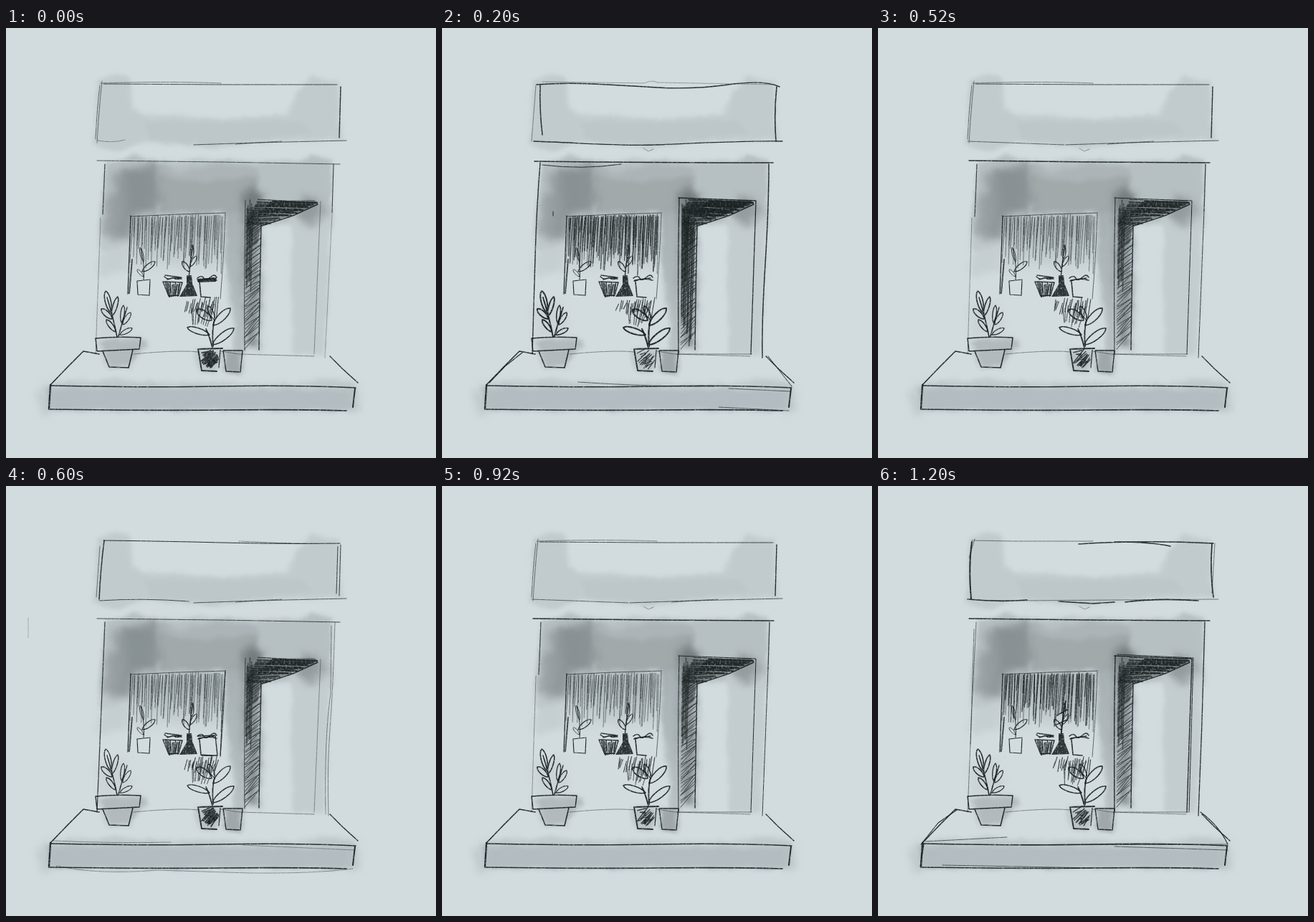
Recreate the animation shown at these times as an HTML page. Size 600 px wide and 600 px high, loop 1400 ms.

```html
<!DOCTYPE html>
<html lang="en">
<head>
<meta charset="utf-8">
<title>Shopfront sketch</title>
<style>
html, body { margin: 0; width: 100%; height: 100%; overflow: hidden; background: #d2dcdf; }
svg { display: block; width: 100%; height: 100%; }
.ink { fill: none; stroke: #192022; stroke-linecap: round; stroke-linejoin: round; filter: url(#pencil); }
.pose { visibility: hidden; animation: 1400ms step-end infinite; }
#a { animation-name: a; }
#b { animation-name: b; }
#c { animation-name: c; }
#d { animation-name: d; }
#e { animation-name: e; }
@keyframes a { 0% { visibility: visible; } 14.2857%, 100% { visibility: hidden; } }
@keyframes b {
  0%, 28.5714%, 85.7143%, 100% { visibility: hidden; }
  14.2857%, 71.4286% { visibility: visible; }
}
@keyframes c {
  0%, 42.8571%, 71.4286%, 100% { visibility: hidden; }
  28.5714%, 57.1429% { visibility: visible; }
}
@keyframes d { 0%, 57.1429%, 100% { visibility: hidden; } 42.8571% { visibility: visible; } }
@keyframes e { 0% { visibility: hidden; } 85.7143%, 100% { visibility: visible; } }
</style>
</head>
<body>
<svg viewBox="0 0 600 600">
  <defs>
    <filter id="pencil" filterUnits="userSpaceOnUse" x="0" y="0" width="600" height="600" color-interpolation-filters="sRGB">
      <feTurbulence type="fractalNoise" baseFrequency=".4" numOctaves="2" seed="4" result="n"/>
      <feDisplacementMap in="SourceGraphic" in2="n" scale="1.2" xChannelSelector="R" yChannelSelector="G" result="s"/>
      <feColorMatrix in="n" values="0 0 0 0 0  0 0 0 0 0  0 0 0 0 0  -1.5 0 0 0 1.75" result="m"/>
      <feComposite in="s" in2="m" operator="in"/>
    </filter>
    <filter id="wash" filterUnits="userSpaceOnUse" x="0" y="0" width="600" height="600" color-interpolation-filters="sRGB">
      <feTurbulence type="fractalNoise" baseFrequency=".035" numOctaves="3" seed="9" result="n"/>
      <feGaussianBlur in="SourceGraphic" stdDeviation="3" result="s"/>
      <feDisplacementMap in="s" in2="n" scale="9" xChannelSelector="R" yChannelSelector="G"/>
    </filter>
    <filter id="soft" filterUnits="userSpaceOnUse" x="0" y="0" width="600" height="600" color-interpolation-filters="sRGB">
      <feTurbulence type="fractalNoise" baseFrequency=".03" numOctaves="3" seed="2" result="n"/>
      <feGaussianBlur in="SourceGraphic" stdDeviation="6" result="s"/>
      <feDisplacementMap in="s" in2="n" scale="14" xChannelSelector="R" yChannelSelector="G"/>
    </filter>
    <linearGradient id="column" x1="0" y1="0" x2="0" y2="1">
      <stop offset="0" stop-color="#a6afb2"/><stop offset="1" stop-color="#b8c1c4"/>
    </linearGradient>
    <linearGradient id="pane" x1="0" y1="0" x2="0" y2="1">
      <stop offset="0" stop-color="#a5aeb1"/><stop offset="1" stop-color="#a5aeb1" stop-opacity="0"/>
    </linearGradient>
    <linearGradient id="shade" x1="0" y1="0" x2="1" y2="0">
      <stop offset="0" stop-color="#9aa2a5"/><stop offset=".55" stop-color="#7f878a"/><stop offset="1" stop-color="#858d90"/>
    </linearGradient>
  </defs>

  <g filter="url(#wash)">
    <path fill="#c1cbcd" d="M126 74L150 65L174 70L176 108Q182 120 210 122L300 126L386 122Q404 110 404 92L424 68L464 76L468 156L400 158L330 162L285 168L240 162L195 161L150 171L122 166Z"/>
    <path fill="#b9c3c5" opacity=".5" d="M195 132L410 130L430 148L300 163L200 160Z"/>
    <path fill="#b6bfc1" d="M138 190L180 178L210 187L300 186L405 186L430 178L454 184L455 280L400 285L398 274L356 276L330 300L304 258L174 262L172 296Q155 312 132 308Z"/>
    <path fill="#c3ccce" d="M400 264L453 264L446 456L402 456Q394 350 400 264Z"/>
    <path fill="url(#column)" d="M305 255L335 250L333 454L320 454L316 390L307 350Z"/>
    <path fill="#9aa2a5" opacity=".75" d="M214 190L245 200L290 190L352 194L352 250L308 258L214 260Z"/>
    <path fill="#b9c2c5" opacity=".45" d="M215 184H355V205L280 216L215 204Z"/>
    <path fill="#b3bdc1" d="M56 500L488 503L487 534L56 534Z"/>
    <path fill="#c0cacc" d="M64 494L150 490L210 494L400 496L440 488L486 498L484 505L62 502Z"/>
    <path fill="#b2babd" d="M127 435L190 432L198 440L186 454L176 474L145 474L136 455Z"/>
    <path fill="#9fa7aa" d="M304 450L330 450L327 482L306 480Z"/>
    <path fill="#b9c2c5" d="M264 448H302L296 482L270 478Z"/>
  </g>
  <g filter="url(#soft)">
    <path fill="url(#shade)" opacity=".85" d="M152 196L212 192L216 254L178 260L172 296L150 304L138 288L137 240L152 226Z"/>
    <path fill="#b9c3c6" opacity=".7" d="M44 510L62 494L64 536L50 538ZM440 490L490 496L494 534L478 538L482 504Z"/>
    <path fill="#c2cbce" opacity=".8" d="M129 298L172 290L170 340L130 350Z"/>
    <path fill="#cad3d6" d="M128 385L168 380L172 430L128 434Z"/>
    <path fill="url(#pane)" d="M176 264H302V345H176Z"/>
    <ellipse cx="344" cy="242" rx="17" ry="16" fill="#6b7275" opacity=".8"/>
    <ellipse cx="423" cy="255" rx="16" ry="20" fill="#8a9194" opacity=".75"/>
    <path fill="#737b7e" opacity=".8" d="M332 255H355L353 448H336Z"/>
  </g>

  <g id="base" class="ink"></g>
  <g id="a" class="ink pose"></g>
  <g id="b" class="ink pose"></g>
  <g id="c" class="ink pose"></g>
  <g id="d" class="ink pose"></g>
  <g id="e" class="ink pose"></g>
</svg>
<script>
let seed = 17;
const rnd = (lo = 0, hi = 1) => {
  seed = (seed * 16807) % 2147483647;
  return lo + (hi - lo) * seed / 2147483647;
};
const mix = (p, q, t) => p + (q - p) * t;
const f = n => n.toFixed(1);
const line = (d, w = 1.5, o = .95) => `<path d="${d}" stroke-width="${w}" opacity="${o}"/>`;
const solid = (d, o = .9) => `<path d="${d}" fill="#192022" stroke="none" opacity="${o}"/>`;

// Pointed oval between two ends, w is the bulge on each side
function leaf(x1, y1, x2, y2, w, sw = 1.6) {
  const len = Math.hypot(x2 - x1, y2 - y1);
  const nx = -(y2 - y1) / len * w * 1.35, ny = (x2 - x1) / len * w * 1.35;
  const at = (t, s) => `${f(mix(x1, x2, t) + nx * s)} ${f(mix(y1, y2, t) + ny * s)}`;
  return line(`M${x1} ${y1}C${at(.25, 1)} ${at(.85, 1)} ${x2} ${y2}C${at(.85, -1)} ${at(.25, -1)} ${x1} ${y1}`, sw);
}

// Strokes running from edge p to edge q; each edge is [x1, y1, x2, y2]
function hatch(n, p, q, w, o, jit = 3, startJit = jit) {
  let d = '';
  for (let i = 0; i < n; i++) {
    const t = (i + rnd(0, .8)) / n;
    const side = rnd(-1, 1) * Math.min(jit * .4, 2);
    d += `M${f(mix(p[0], p[2], t))} ${f(mix(p[1], p[3], t) + rnd(-startJit, startJit))}` +
         `L${f(mix(q[0], q[2], t) + side)} ${f(mix(q[1], q[3], t) + rnd(-jit, jit))}`;
  }
  return line(d, w, o);
}

const curtain = (n, w, o) =>
  hatch(n, [177, 264, 303, 262], [174, 318, 300, 332], w, o, 16, 2) +
  hatch(n >> 1, [179, 264, 303, 262], [177, 292, 302, 306], w, o, 12, 2);

const lowerHatch = x =>
  hatch(17, [x + 3, 382, 298, 379], [x, 394, 294, 402], 1.2, .8, 4) +
  hatch(10, [257, 388, 292, 384], [259, 412, 280, 414], 1.1, .7, 4);

const potHatch = (n, w) =>
  hatch(n, [272, 454, 296, 466], [285, 448, 281, 474], w, .85, 2) +
  hatch(n, [272, 466, 288, 474], [288, 450, 297, 462], w, .85, 2);

const frontPlants = w =>
  line('M155 431Q150 405 141 376M157 430Q162 410 169 390', w) +
  leaf(146, 397, 139, 367, 4, w) + leaf(148, 406, 133, 392, 3.5, w) + leaf(148, 402, 156, 375, 3, w) +
  leaf(153, 424, 140, 407, 3, w) +
  leaf(161, 411, 164, 387, 2.6, w * .8) + leaf(163, 414, 174, 397, 3, w * .8) +
  leaf(159, 428, 176, 419, 3, w * .8) +
  line('M288 446Q284 430 279 420M289 444Q287 420 291 407', w + .3) +
  leaf(287, 408, 266, 393, 5, w) + leaf(289, 415, 313, 391, 5, w) + leaf(284, 428, 253, 418, 4, w) +
  leaf(288, 442, 318, 419, 5, w) + leaf(291, 407, 282, 388, 3, w);

const base =
  // plinth
  line('M62 498L86 473L108 451L130 455', 1.6) + line('M452 458L470 476L491 495', 1.4) +
  line('M62 499Q200 502 300 500T488 502', 1.5) + line('M62 498L60 531', 2.4) +
  line('M60 532Q200 534 300 533T475 534', 1.7) + line('M487 503L484 529', 2) +
  line('M178 455Q240 449 268 452M300 451L325 455L430 458', .8, .6) +
  // window frame
  line('M174 262L170 371', 1.3) + line('M176 323L172 370', 2, .8) +
  line('M174 263L240 260L306 258', .9, .8) + line('M306 258Q304 320 299 378', .8, .8) +
  curtain(46, .9, .6) +
  // sill plants
  line('M183 353L201 351L200 373L184 372Z', 1.2) + line('M192 351Q194 332 188 308', 1) +
  leaf(190, 340, 208, 326, 3.5, 1.2) + leaf(192, 326, 187, 306, 2, .9) + leaf(192, 347, 183, 337, 2, .9) +
  line('M219 354L246 355L241 373L227 374Z', 1.4) +
  hatch(10, [222, 357, 244, 356], [228, 374, 240, 372], 1.6, .85, 2) +
  line('M221 347q6 6 12 1q6 5 12 0M225 351q9 -4 20 -1M222 345l22 3', 1.4) +
  solid('M252 345L259 345L260 356L267 374L242 375L252 358Z') +
  line('M255 350Q257 325 261 303', 1.4) +
  leaf(256, 340, 246, 326, 3, 1.3) + leaf(257, 333, 266, 318, 2.5, 1.2) + leaf(259, 322, 260, 304, 2.4, 1.1) +
  line('M270 354L272 375L285 376M268 353Q282 348 294 352', 1.6) +
  line('M267 349q6 -5 9 0t9 -1t9 0M269 352l22 -3', 1.5) +
  // front pots
  line('M125 433Q155 430 188 432L186 448L127 451L125 433', 1.5) +
  line('M135 451L144 473L171 474L177 449', 1.6) +
  line('M268 448L302 447M268 448L273 478L294 479', 1.8) + line('M299 449L297 474', 1.2) +
  line('M303 450L330 450L327 480L307 479L303 450', 1.4) +
  // doorway
  solid('M336 252L372 241L430 240L436 245L400 260L356 276L351 300L337 310Z', .4) +
  hatch(24, [335, 275, 352, 240], [362, 274, 432, 242], 1.6, .75, 2) +
  hatch(10, [352, 260, 372, 242], [396, 261, 435, 245], 2.1, .85, 2) +
  hatch(50, [335, 270, 333, 446], [356, 256, 352, 428], 1, .72, 4) +
  hatch(12, [335, 250, 345, 250], [334, 345, 342, 365], 1.5, .6, 14) +
  line('M356 276Q354 360 353 449', 1.4) + line('M435 246L400 262L357 276', 1.5);

const signTop = line('M132 77Q230 74 300 77', .7, .7) + line('M136 78L300 79L462 79', 1, .8);
const signSides = line('M131 80Q127 112 125 155M134 74Q130 110 127 160', .8, .75) + line('M467 82L465 153', 1.4);
const signFoot = line('M262 163L350 160L475 157', .9, .8) + line('M320 162L385 158', .9, .7);
const tick = line('M281 168L288 172L295 169', .7, .6);
const doorFrame = w =>
  line('M330 237L438 241L431 455', w) + line('M331 237Q329 330 330 453', w) + line('M328 455L432 455', .8, .7);
const doorThin = line('M439 242L430 455', .7, .6) + line('M334 240Q332 350 333 450', 1, .8);

const poses = {
  a: signTop + signSides + signFoot + line('M128 157q20 4 38 -1', .7, .6) +
    line('M127 185L300 187L466 190', .9, .8) +
    line('M138 190L135 260', 1.2, .85) + line('M132 265L125 455', .7, .6) +
    line('M457 190L455 258', 1.1, .85) + line('M455 260L445 460', .6, .6) +
    doorThin + lowerHatch(249) + potHatch(13, 2.1) + frontPlants(1.5) +
    solid('M266 350L294 348L293 354L268 355Z'),

  b: line('M132 79Q170 76 210 78T300 83T400 79T471 82', 1.4) + line('M140 75L282 77q12 -5 18 -1L462 79', .6, .6) +
    line('M467 82Q463 120 466 158', 1.6) + line('M137 80Q136 115 140 149', 1.5) +
    line('M131 80L125 158', .7, .7) + line('M128 158C190 160 250 165 300 163S420 157 475 158', 1.3) + tick +
    line('M129 186Q300 188 462 188', 1.7) + line('M140 191Q195 198 250 190', 1) +
    line('M137 188Q132 250 130 320T126 455', 1.4) + line('M155 256v6', 1) +
    line('M456 190Q456 250 451 330T447 460', 1.5) +
    doorFrame(1.3) + curtain(38, 1.5, .7) + lowerHatch(243) + potHatch(8, 1.2) + frontPlants(2) +
    hatch(18, [336, 256, 345, 240], [372, 268, 436, 243], 1.9, .75, 2) +
    hatch(14, [334, 250, 354, 280], [334, 400, 348, 440], 1.4, .75, 8) +
    line('M66 495L88 472L112 453', 1.1) + line('M455 458L488 500', 1) +
    line('M190 494Q300 501 380 500M386 529L484 534M400 503L486 507', .9, .75),

  c: signTop + signSides + signFoot + line('M125 158L260 163', .9, .7) + tick +
    line('M127 185L300 187L463 188', 1.4) +
    line('M138 190L135 263', 1.2, .85) + line('M131 265L125 455', .7, .6) +
    line('M457 190L455 255', 1.3, .85) + line('M455 255L447 460', 1, .85) +
    doorFrame(1) + lowerHatch(243) + potHatch(9, 1.4) + frontPlants(1.6),

  d: line('M136 76Q220 77 300 79T466 80', 1.1) + line('M325 77L368 79L398 80', .7, .7) +
    line('M137 76Q132 115 130 158', 1.5) + line('M131 84L126 155', .8, .7) +
    line('M467 82L465 153M463 84L461 150', 1.1, .8) + signFoot + line('M130 160Q190 156 255 161', 1, .8) +
    line('M127 185L300 187L466 190', 1, .8) +
    line('M138 190Q134 300 127 455', 1.3, .85) +
    line('M459 190Q456 290 452 340T450 460M454 195L453 290Q444 350 446 458', .7, .7) +
    line('M31 184V212', .6, .45) +
    doorThin + lowerHatch(249) + potHatch(12, 1.9) + frontPlants(1.4) +
    line('M306 258L303 300L299 376', 1.2) + line('M268 349L292 348L295 376L273 376', 1.4) +
    line('M66 495Q150 499 230 497M70 530Q130 543 210 536L340 540Q430 541 484 534M330 501L486 508', .7, .6),

  e: line('M131 76L190 77L300 77', .8, .7) + line('M280 81Q370 75 468 80M330 78Q380 78 408 84', 1.4) +
    line('M131 78Q126 112 130 158', 2) + line('M135 74L127 100', .8, .7) +
    line('M466 80Q463 120 468 155', 1.7) + line('M470 80L466 150', .8, .7) +
    line('M125 158Q170 162 208 159M252 161L300 164L330 162M345 162Q390 156 447 160', 1.7) +
    line('M200 160L475 158', .8, .7) + tick +
    line('M127 185L300 187L463 188', 1.3) +
    line('M137 190L131 310L125 455M134 200L129 360', .8, .7) +
    line('M456 190L452 330L447 460', 1.3) +
    doorFrame(1.4) + line('M334 235L440 240L434 455', 1) +
    curtain(26, 1.4, .7) + lowerHatch(243) + potHatch(9, 1.4) + frontPlants(1.6) +
    line('M262 300Q258 320 256 345M250 320L264 312M249 333L264 326', 1.6) +
    line('M60 500L84 470L110 452M64 499L59 531M450 455Q476 474 488 500', 1.2) +
    line('M66 496L180 490M200 501L487 500M330 503L488 508M90 529L300 533', .9, .75)
};

const put = (id, parts) => { document.getElementById(id).innerHTML = parts; };
put('base', base);
for (const id in poses) put(id, poses[id]);
</script>
</body>
</html>
```
